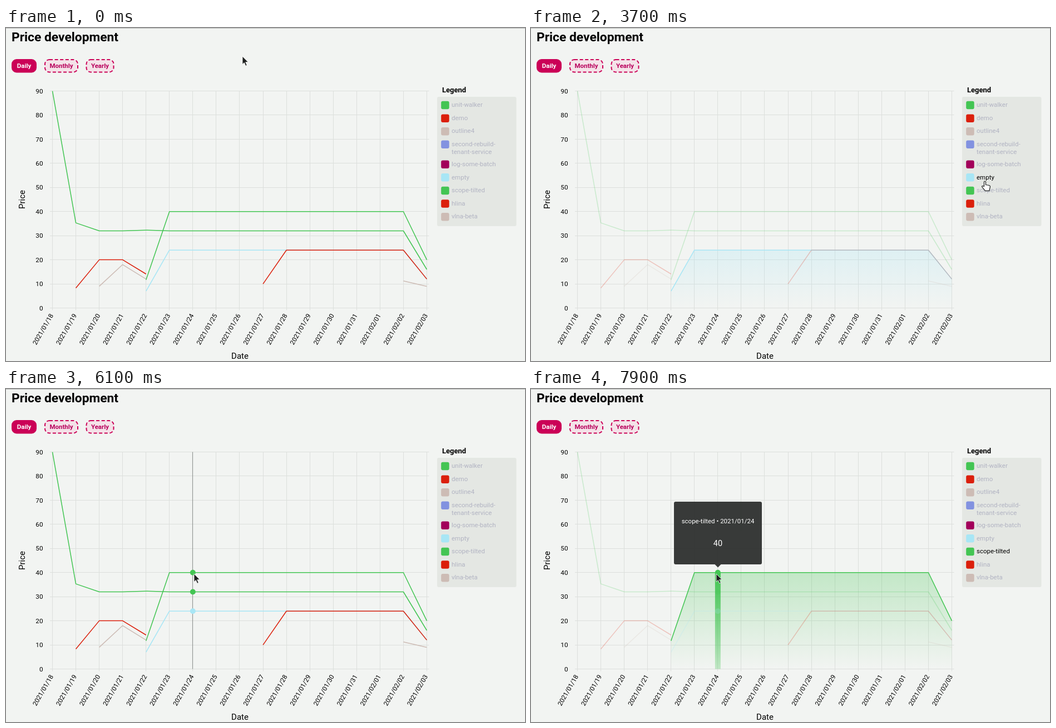
An HTML page that plays this animation: 933 px wide and 600 px high, repeating every 8000 ms.

```html
<!DOCTYPE html>
<html lang="en">
<head>
<meta charset="utf-8">
<title>Price development</title>
<style>
html, body { margin: 0; width: 100%; height: 100%; overflow: hidden; background: #f2f4f2; }
svg { display: block; width: 100%; height: 100%; font-family: Roboto, sans-serif; font-size: 11.5px; }
</style>
</head>
<body>
<svg id="stage" viewBox="0 0 933 600"></svg>
<script>
const LOOP = 8000, STEP = 100;
const DAYS = 17, X0 = 83.5, DX = 42.06, Y0 = 504.5, UNIT = 4.344;
const GREEN = '#43c553', RED = '#db1f0b', SAND = '#cdbcb5', CYAN = '#a8e6f5', PINK = '#cb0057';
const stage = document.getElementById('stage');

const px = i => X0 + DX * i;
const py = v => Y0 - UNIT * v;
const crisp = v => Math.floor(v) + 0.5;
const clamp = v => Math.max(0, Math.min(1, v));
const mix = (a, b, k) => a + (b - a) * k;
const ease = k => k * k * (3 - 2 * k);
const ramp = (t, from, to) => clamp((t - from + STEP) / (to - from + STEP));

function set(el, attrs) {
  for (const k in attrs) el.setAttribute(k, attrs[k]);
}
function add(tag, attrs = {}, parent = stage, text) {
  const el = document.createElementNS('http://www.w3.org/2000/svg', tag);
  set(el, attrs);
  if (text !== undefined) el.textContent = text;
  parent.appendChild(el);
  return el;
}
const label = (x, y, text, attrs = {}, parent = stage) => add('text', { x, y, ...attrs }, parent, text);
const box = (x, y, width, height, rx, attrs, parent = stage) =>
  add('rect', { x, y, width, height, rx, ...attrs }, parent);

// A series that rises to a level, stays there and drops on the last day
const plateau = (first, level, last, from) =>
  [first, ...Array(DAYS - 2 - from).fill(level), last];

const series = [
  { name: ['unit-walker'], color: GREEN, from: 0, data: [90, 35.3, 32, 32, ...plateau(32.3, 32, 16, 4)] },
  { name: ['demo'], color: RED, from: 1, data: [8.3, 20, 20, 14.1] },
  { name: ['outline4'], color: SAND, from: 2, data: [9, 18, 12] },
  { name: ['second-rebuild-', 'tenant-service'], color: '#8292e0' },
  { name: ['log-some-batch'], color: '#a2005a' },
  { name: ['empty'], color: CYAN, from: 4, data: plateau(7, 24, 12, 4) },
  { name: ['scope-tilted'], color: GREEN, from: 4, data: plateau(11.7, 40, 20, 4) },
  { name: ['hlina'], color: RED, from: 9, data: plateau(10, 24, 12, 9) },
  { name: ['vlna-beta'], color: SAND, from: 15, data: [11.2, 9] }
];
const [WALKER, DEMO, EMPTY, SCOPE] = [0, 1, 5, 6];

// Header and buttons
const defs = add('defs');
const bold = { 'font-weight': 700 };
const middle = { 'text-anchor': 'middle' };
box(0, 0, 933, 600, 0, { fill: '#f2f4f2' });
box(0, 0, 933, 1, 0, { fill: '#b9bbb9' });
label(10, 24, 'Price development', { ...bold, 'font-size': 22.8 });

function button(x, w, text, active) {
  const look = active ? { fill: PINK } : { fill: '#f4e2e8', 'stroke-dasharray': '6 3.6' };
  box(x + 1, 57, w - 2, 22.5, 8, { ...look, stroke: PINK, 'stroke-width': 2 });
  label(x + w / 2, 72, text, { ...bold, ...middle, 'font-size': 11.5, fill: active ? '#fff' : '#b8005c' });
}
button(10, 45, 'Daily', true);
button(69, 61, 'Monthly');
button(143.5, 51, 'Yearly');

// Axes
const grid = add('g', { stroke: '#dcdfdc' });
const right = { 'text-anchor': 'end', 'font-size': 11.7 };
for (let v = 0; v <= 90; v += 10) {
  add('path', { d: `M79 ${crisp(py(v))}H760.5` }, grid);
  label(66.5, py(v) + 4.1, v, right);
}
for (let i = 0; i < DAYS; i++) {
  add('path', { d: `M${crisp(px(i))} ${py(90)}V508.5` }, grid);
  const date = new Date(Date.UTC(2021, 0, 18 + i)).toISOString().slice(0, 10).replace(/-/g, '/');
  label(0, 4.1, date, { ...right, transform: `translate(${px(i) - 1.5} 515.8) rotate(-60)` });
}
label(420.5, 596, 'Date', { ...middle, 'font-size': 15 });
label(0, 0, 'Price', { ...middle, 'font-size': 15, transform: 'translate(34 309) rotate(-90)' });

// Legend
label(784, 116, 'Legend', { ...bold, 'font-size': 13 });
box(775, 124, 142.5, 233, 3, { fill: '#e4e7e3' });
let row = 139;
for (const s of series) {
  box(782.2, row - 7.2, 14.5, 14.5, 3, { fill: s.color });
  s.labels = s.name.map((text, k) => label(801, row + 3.2 + 14 * k, text));
  row += 23.6 + 12.3 * (s.name.length - 1);
}

// Chart lines, areas and dots
function fade(id, color, top, bottom) {
  const g = add('linearGradient', { id, x2: 0, y2: 1 }, defs);
  [top, bottom].forEach((opacity, offset) =>
    add('stop', { offset, 'stop-color': color, 'stop-opacity': opacity }, g));
  return { fill: `url(#${id})` };
}
const areas = add('g'), lines = add('g');
const pointer = add('path', { stroke: '#4c4f4e', 'stroke-width': 1.2 });
const dots = add('g');
const bar = box(px(6) - 5, py(40), 10, 40 * UNIT, 0, fade('bar', GREEN, 1, 0.28), dots);
// The empty line lies below the others
const plots = series.filter(s => s.data).sort((a, b) => (b.color === CYAN) - (a.color === CYAN));
plots.forEach((s, i) => {
  const pts = s.data.map((v, k) => `${px(s.from + k)} ${py(v)}`).join('L');
  s.area = add('path', { d: `M${px(s.from)} ${Y0}L${pts}V${Y0}Z`, ...fade('area' + i, s.color, 0.27, 0) }, areas);
  s.line = add('path', { d: 'M' + pts, fill: 'none', stroke: s.color, 'stroke-width': 1.5, 'stroke-linejoin': 'round' }, lines);
  s.dot = add('circle', { r: 5, fill: s.color }, dots);
});

// Tooltips
function bubble(x, y, w, h, tip) {
  const g = add('g', { fill: '#fff' });
  const dark = add('g', { fill: '#2b2d2c', opacity: 0.93 }, g);
  box(x, y, w, h, 3, {}, dark);
  add('path', { d: tip }, dark);
  return g;
}
const axisTip = bubble(351.5, 268.5, 119.5, 80.5, 'M352 303l-6 6 6 6z');
[WALKER, EMPTY, SCOPE].forEach((i, k) => {
  const s = series[i], y = 285 + 23.6 * k;
  box(361, y - 6, 11.5, 11.5, 2.5, { fill: s.color }, axisTip);
  label(380, y + 4.6, `${s.name[0]}: ${s.data[6 - s.from]}`, {}, axisTip);
});
const itemTip = bubble(257, 203, 158, 113, 'M330 315.5l6 6 6-6z');
const itemText = add('g', middle, itemTip);
label(336, 242, series[SCOPE].name[0] + ' • 2021/01/24', {}, itemText);
label(336, 283, '40', { 'font-size': 14.5 }, itemText);

// Mouse pointers
const arrow = add('path', {
  d: 'M0 0V14.5L3.3 11.5 5.8 17.3 8.2 16.2 5.7 10.6H10.3Z',
  fill: '#1c1e1d', stroke: '#fff', 'stroke-width': 0.8
});
const hand = add('path', {
  d: 'M4.5 10V2a1.5 1.5 0 0 1 3 0v5l6 1q2 .5 2 2.5l-1.7 7.3H6.5L.8 10.8q-.6-1.8 1.2-1.8z',
  fill: '#fff', stroke: '#1c1e1d', 'stroke-width': 1.2, 'stroke-linejoin': 'round'
});

// Mouse moves: start, end, x, y
const moves = [
  [800, 900, 645, 76], [1100, 1500, 808, 143], [2000, 2000, 796.5, 138],
  [2300, 2500, 803, 160], [3400, 3700, 810, 275.5], [4300, 4300, 876, 307],
  [4600, 5300, 326, 327], [5500, 6100, 338, 333], [6800, 6800, 340, 335], [6900, 7100, 333, 333]
];
// Highlights: series, start, end
const focus = [[WALKER, 1300, 2300], [DEMO, 2300, 3400], [EMPTY, 3500, 4600], [SCOPE, 6900, LOOP]];

function mouseAt(t) {
  let x = 425, y = 51;
  for (const [from, to, tx, ty] of moves) {
    const k = ease(ramp(t, from, to));
    x = mix(x, tx, k);
    y = mix(y, ty, k);
  }
  return [x, y];
}

function draw(time) {
  const t = Math.floor(time / STEP) * STEP;
  const [mx, my] = mouseAt(t);
  const transform = `translate(${mx} ${my})`;
  const onLegend = t >= 1300 && t < 4300;
  set(arrow, { transform, opacity: onLegend ? 0 : 1 });
  set(hand, { transform, opacity: onLegend ? 1 : 0 });

  const level = series.map(() => 0);
  for (const [i, on, off] of focus) level[i] = ramp(t, on, on + 200) - ramp(t, off, off + 200);
  const any = clamp(level.reduce((a, b) => a + b));

  const inChart = t >= 4600 && mx < 760;
  const day = Math.round((mx - X0) / DX);
  series.forEach((s, i) => {
    const k = level[i];
    const ink = [177, 179, 194].map(c => Math.round(mix(c, 0, k)));
    s.labels.forEach(l => set(l, { fill: `rgb(${ink})` }));
    if (!s.data) return;
    const opacity = 1 - 0.77 * (any - k);
    set(s.line, { opacity });
    set(s.area, { opacity: k });
    const v = s.data[day - s.from];
    const shown = inChart && v !== undefined;
    set(s.dot, { opacity: shown ? opacity : 0, cx: px(day), cy: shown ? py(v) : 0 });
  });
  set(bar, { opacity: level[SCOPE] });

  const axisOut = 1 - ramp(t, 6900, 7000);
  const soft = t >= 6000 && t < 6300;
  set(pointer, { d: `M${crisp(px(day))} ${py(90)}V${Y0}`, opacity: inChart ? (soft ? 0.5 : 0.85) * axisOut : 0 });

  const tipIn = ramp(t, 6400, 6500);
  set(axisTip, { opacity: tipIn * axisOut, transform: `translate(${8 * (1 - tipIn)} 0)` });
  set(itemTip, { opacity: ramp(t, 7000, 7200) });
  set(itemText, { opacity: t < 7400 ? 0.85 : 1 });
}

let start;
function tick(now) {
  start ??= now;
  draw((now - start) % LOOP);
  requestAnimationFrame(tick);
}
draw(0);
requestAnimationFrame(tick);
</script>
</body>
</html>
```
